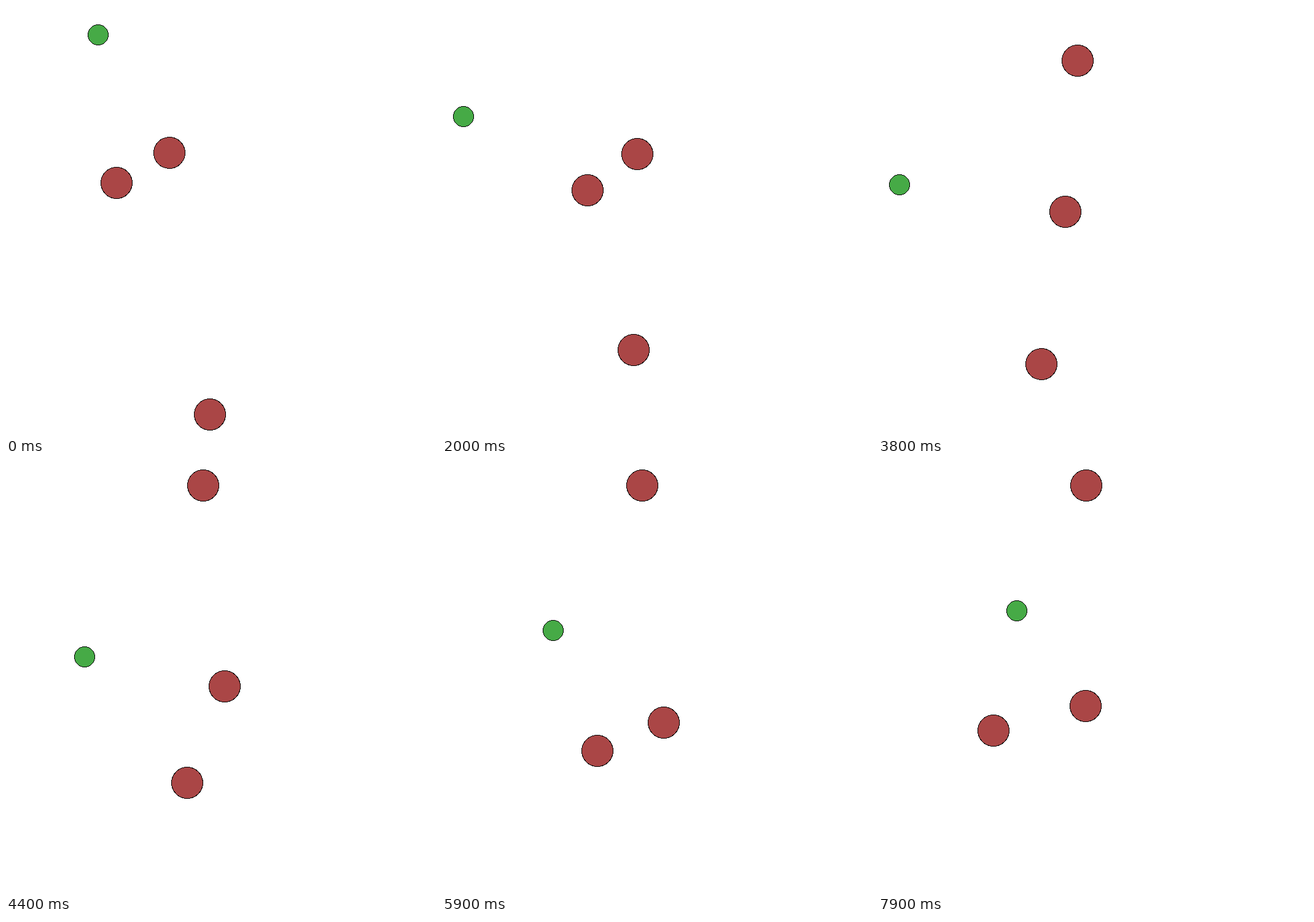
These frames come from a looping animation (700 px wide and 700 px high, 8000 ms). An HTML page:

```html
<!DOCTYPE html>
<html>
<head>
<meta charset="utf-8">
<style>
html, body { margin: 0; width: 100%; height: 100%; overflow: hidden; background: #fff; }
svg { display: block; }
</style>
</head>
<body>
<svg id="stage" width="700" height="700" stroke="#000" shape-rendering="crispEdges"></svg>
<script>
const STEP = 100, STEPS = 80, MID = 350, REACH = 315;

// Every agent passes through its points at these steps
const times = [0, 13, 18, 27, 38, 45, 51, 59, 79];
const chaser = (...points) => ({ color: '#aa4646', r: 25.5, points });
const runner = (...points) => ({ color: '#46aa46', r: 16.5, points });

const agents = [
  chaser([266, 239], [304, 219], [320, 245], [303, 197], [325, 89],
    [320, 35], [310, 35], [326, 35], [339, 35]),
  chaser([180, 288], [179, 241], [226, 280], [266, 361], [305, 335],
    [363, 368], [392, 409], [361, 421], [338, 394]),
  chaser([332, 665], [302, 665], [314, 574], [288, 534], [266, 583],
    [297, 506], [283, 445], [253, 467], [188, 434]),
  runner([150, 47], [57, 83], [35, 153], [35, 257], [35, 291],
    [141, 317], [170, 331], [181, 271], [226, 239])
];

const stage = document.getElementById('stage');
for (const agent of agents) {
  agent.dot = document.createElementNS(stage.namespaceURI, 'circle');
  agent.dot.setAttribute('r', agent.r);
  agent.dot.setAttribute('fill', agent.color);
  stage.append(agent.dot);
}

// Smooth curve through the points that never overshoots them
function along(points, t, k) {
  const last = times.length - 2;
  const slope = i => (points[i + 1][k] - points[i][k]) / (times[i + 1] - times[i]);
  const tangent = i => {
    const a = slope(Math.max(i - 1, 0)), b = slope(Math.min(i, last));
    return a * b > 0 ? 2 * a * b / (a + b) : 0;
  };
  let i = 0;
  while (i < last && times[i + 1] <= t) i++;
  const h = times[i + 1] - times[i], u = (t - times[i]) / h, v = 1 - u;
  return points[i][k] * v * v * (1 + 2 * u) + points[i + 1][k] * u * u * (3 - 2 * u)
    + h * u * v * (v * tangent(i) - u * tangent(i + 1));
}

function draw(t) {
  const spots = agents.map(({ points }) => [0, 1].map(k => along(points, t, k) - MID));
  // The camera zooms so that the farthest agent stays at the edge
  const zoom = REACH / Math.max(...spots.flat().map(Math.abs));
  agents.forEach(({ dot }, i) => {
    const [x, y] = spots[i].map(d => Math.round(MID + d * zoom));
    dot.setAttribute('cx', x);
    dot.setAttribute('cy', y);
  });
}

const start = performance.now();
function tick() {
  draw(Math.floor((performance.now() - start) / STEP) % STEPS);
  requestAnimationFrame(tick);
}
tick();
</script>
</body>
</html>
```
